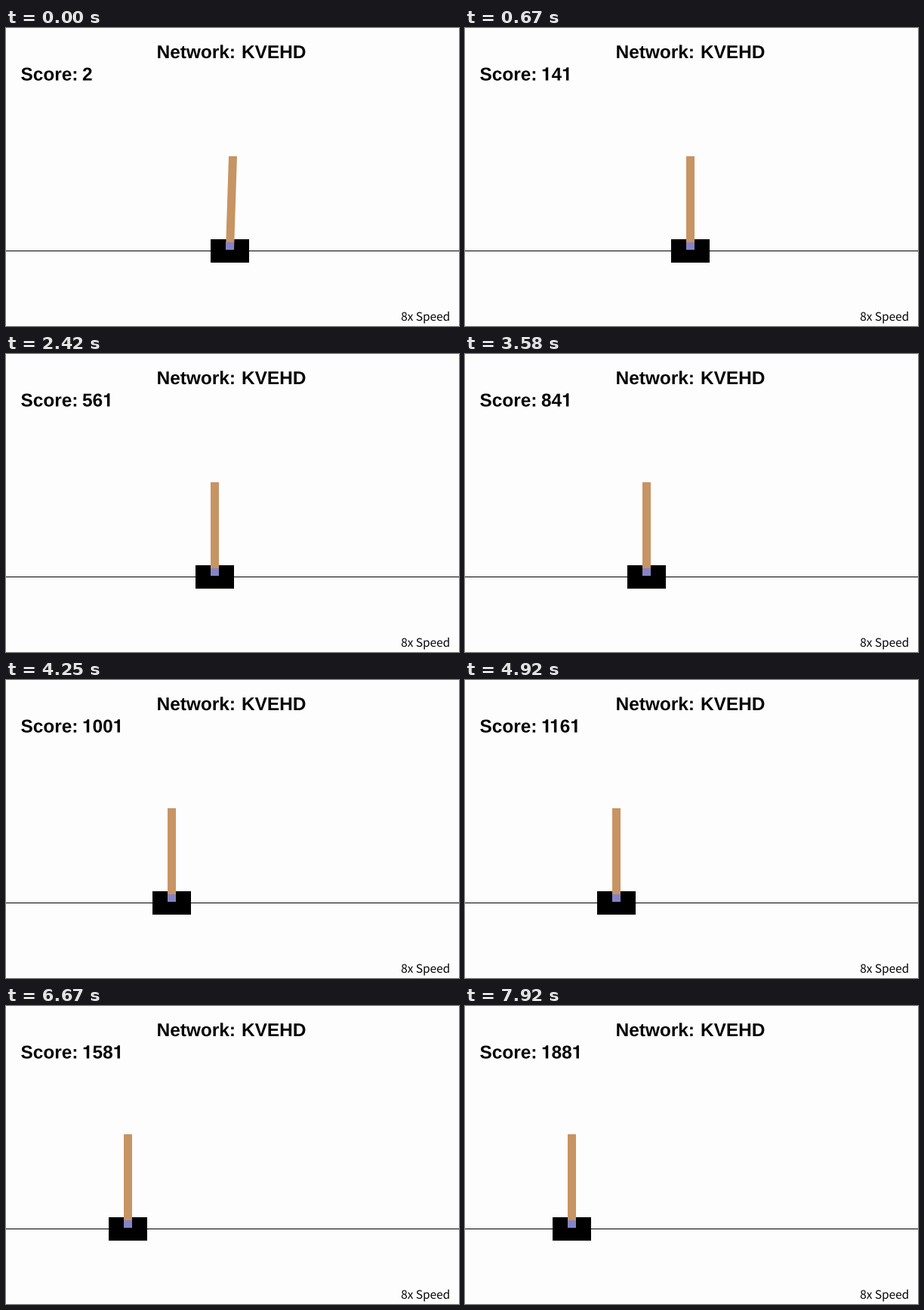
Write a matplotlib script that moves like this. It is 600 px wide and 395 px high and loops after 8 s.

```python
import math

import matplotlib.pyplot as plt
import numpy as np
from matplotlib.animation import FuncAnimation
from matplotlib.patches import PathPatch, Polygon, Rectangle
from matplotlib.path import Path
from matplotlib.textpath import TextPath

W, H, DPI = 600, 395, 100
LOOP_MS, TICK_MS = 8000, 40
STEPS = 96           # simulation steps shown in one loop

PAPER, INK = "#fefdfe", "#050505"
POLE, AXLE = "#c79463", "#8583c6"

BOLD = {"family": "Liberation Sans", "weight": "bold"}
PLAIN = {"family": "Noto Sans CJK JP", "weight": "normal"}
SIZE = 24.4          # heading size in pixels
DIGIT_STEP = 0.556 * SIZE

POLE_W, POLE_TOP, POLE_BOTTOM = 11, 170, 294
START, DRIFT = 271, 6.355   # cart's left edge, speed scale
DECAY, RAMP = 0.0178, 24.2  # drift slows by DECAY, sets in over RAMP steps


def step_at(tick):
    """Simulation step on show, switching on the nearest tick."""
    return int((tick * TICK_MS + 0.85 * TICK_MS) * STEPS / LOOP_MS)


def cart_left(k):
    """Integral of the speed exp(-DECAY k) - exp(-(k / RAMP)^2)."""
    glide = (1 - math.exp(-DECAY * k)) / DECAY
    delay = RAMP * math.sqrt(math.pi) / 2 * math.erf(k / RAMP)
    return round(START - DRIFT * (glide - delay))


def lean(k):
    """Pole top offset: a tilt that dies out, then a lean into the push."""
    push = k / RAMP * math.exp(-(k / RAMP) ** 2)
    return round(4 * math.exp(-k / 2) - 1.5 * push)


def score_at(k):
    return max(2, 20 * k - 19)


def text_path(s, size=SIZE, font=BOLD):
    """Outline of a text with its baseline at y = 0 and y pointing down."""
    p = TextPath((0, 0), s, size=size, prop=font)
    return Path(p.vertices * [1, -1], p.codes)


def shifted(path, x, y):
    return Path(path.vertices + [x, y], path.codes)


def footless_one():
    pts = np.array([(.378, 0), (.378, .71), (.272, .71), (.21, .61), (.069, .598),
                    (.069, .5), (.237, .5), (.237, 0), (.378, 0)])
    return Path(pts * [SIZE, -SIZE], closed=True)


DIGITS = {c: text_path(c) for c in "023456789"}
DIGITS["1"] = footless_one()


def score_path(value):
    x, last, parts = 101, "", []
    for c in str(value):
        if c == last == "1":
            x -= 0.1 * SIZE      # kern a pair of ones
        parts.append(shifted(DIGITS[c], x, 69.5))
        x += DIGIT_STEP
        last = c
    return Path.make_compound_path(*parts)


fig = plt.figure(figsize=(W / DPI, H / DPI), dpi=DPI, facecolor=PAPER)
ax = fig.add_axes([0, 0, 1, 1])
ax.set_xlim(0, W)
ax.set_ylim(H, 0)
ax.axis("off")


def add_path(path):
    return ax.add_patch(PathPatch(path, facecolor=INK, linewidth=0))


def add_text(s, x, y, size=SIZE, font=BOLD):
    add_path(shifted(text_path(s, size, font), x, y))


def add_box(x, y, w, h, color):
    return ax.add_patch(Rectangle((x, y), w, h, facecolor=color,
                                  linewidth=0, antialiased=False))


add_text("Network:", 199.6, 40)
add_text("KVEHD", 312, 40)
add_text("Score:", 19.5, 69.5)
add_text("8x Speed", 523.2, 388, 15.4, PLAIN)

add_box(0, 295, W, 1, "black")
cart = add_box(START, 280, 51, 31, "black")
pole = ax.add_patch(Polygon([(0, 0)] * 3, facecolor=POLE, linewidth=0))
axle = add_box(START, 284, POLE_W, POLE_BOTTOM - 284, AXLE)
score = add_path(score_path(score_at(0)))


def draw(tick):
    k = step_at(tick)
    left = cart_left(k)
    foot = left + 20
    top = foot + lean(k)

    cart.set_x(left)
    axle.set_x(foot)
    pole.set_xy([(foot, POLE_BOTTOM), (top, POLE_TOP),
                 (top + POLE_W, POLE_TOP), (foot + POLE_W, POLE_BOTTOM)])
    score.set_path(score_path(score_at(k)))
    return cart, pole, axle, score


anim = FuncAnimation(fig, draw, frames=LOOP_MS // TICK_MS, interval=TICK_MS,
                     init_func=lambda: draw(0), repeat=True, repeat_delay=0)
plt.show()
```
